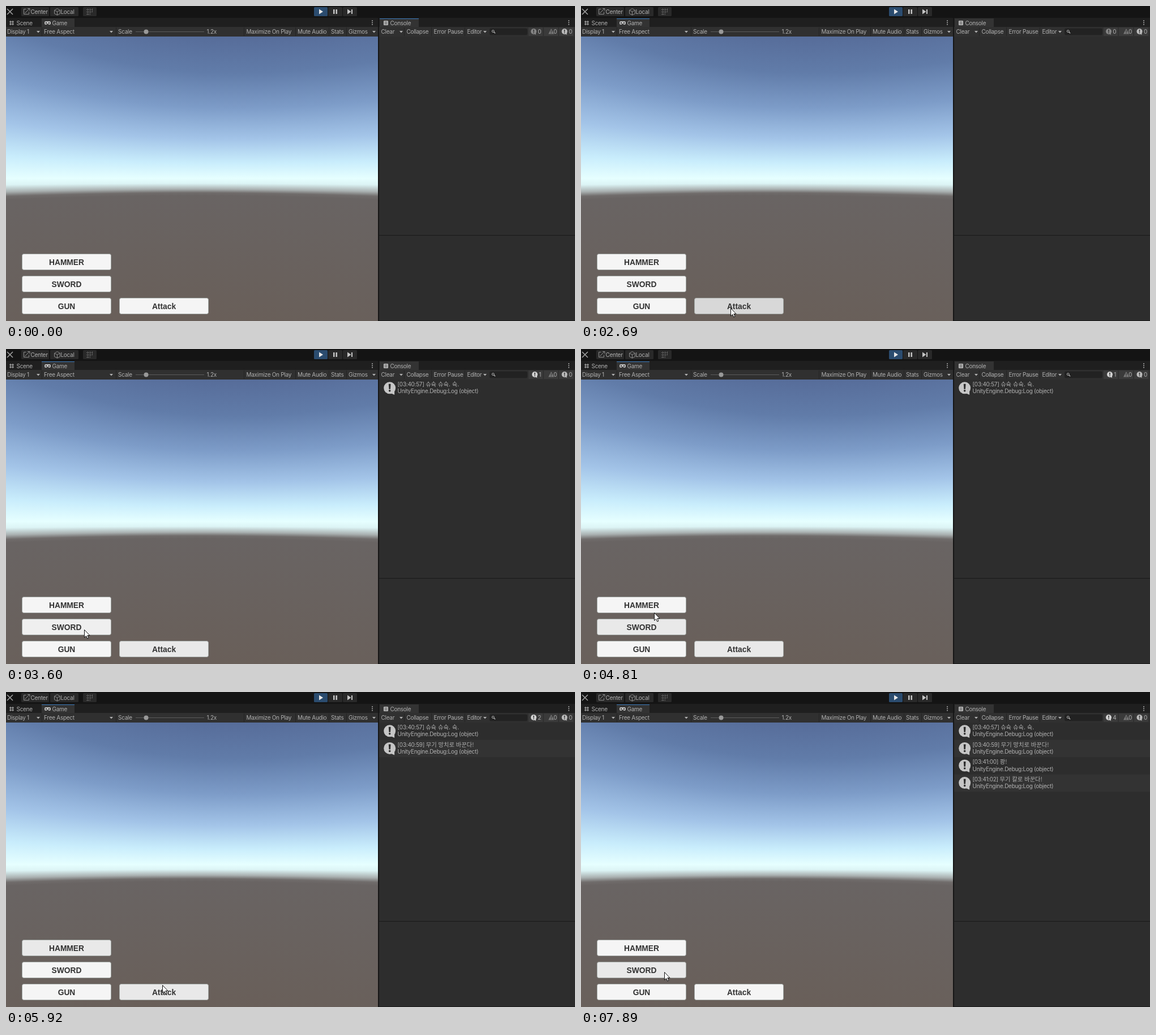
Animation of 1005 by 557 pixels, one loop 8000 ms. Source, as an HTML page with a canvas:

```html
<!DOCTYPE html>
<html lang="ko">
<head>
<meta charset="utf-8">
<title>Weapon switch demo</title>
<style>
html, body { margin: 0; width: 100%; height: 100%; overflow: hidden; background: #2d2d2d; }
canvas, svg { position: absolute; left: 0; top: 0; display: block; }
text { font: 10px Inter, "Noto Sans CJK KR", "Noto Sans CJK", sans-serif; letter-spacing: -.28px; fill: #b0b0b0; white-space: pre; }
.ko { font: 10.3px "Noto Sans CJK KR", "Noto Sans CJK", sans-serif; letter-spacing: 0; }
.label { font: bold 13.8px "Liberation Sans", Arial, sans-serif; letter-spacing: 0; fill: #323232; text-anchor: middle; }
</style>
</head>
<body>
<canvas id="sky" width="657" height="557"></canvas>
<svg id="ui" width="1005" height="557" viewBox="0 0 1005 557"></svg>
<script>
const LOOP = 8000, STEP = 70;
const $ = id => document.getElementById(id);

// Colour depends on elevation, seen through a 60 degree camera; the sky is brighter to the left.
function paintSky() {
  const g = $('sky').getContext('2d');
  const cx = 329, cy = 305, half = 252, focal = half * Math.sqrt(3);
  const sky = [[0, '#e6ffff'], [.11, '#c9edfc'], [.28, '#a3c4e8'], [.5, '#7d9cc8'], [.75, '#617ca9'], [1, '#576d9a']];
  const ground = [[0, '#e6ffff'], [.035, '#dcf4f5'], [.075, '#a9b0b0'], [.1, '#706c6b'], [.12, '#696463'], [1, '#695f59']];
  const column = (x, top, reach, stops) => {
    const fill = g.createLinearGradient(0, cy, 0, cy + reach);
    stops.forEach(([at, color]) => fill.addColorStop(at, color));
    g.fillStyle = fill;
    g.fillRect(x, top, 1, half);
  };
  for (let x = 0; x < 657; x++) {
    const u = (x - cx) / cx;
    const reach = half * Math.hypot(1, (x - cx) / focal);
    column(x, cy - half + 1, -reach * (1 - .12 * u), sky);
    column(x, cy, reach, ground);
  }
}

const box = (x, y, w, h, fill, more = '') =>
  `<rect x="${x}" y="${y}" width="${w}" height="${h}" fill="${fill}" ${more}/>`;
const path = (d, more) => `<path d="${d}" ${more}/>`;
const line = (d, color = '#8c8c8c', w = 1, more = '') =>
  path(d, `fill="none" stroke="${color}" stroke-width="${w}" ${more}`);
const text = (x, y, s, more = '') => `<text x="${x}" y="${y}" ${more}>${s}</text>`;
const arrow = x => path(`M${x - 3} 44h6l-3 3.6z`, 'fill="#b0b0b0"');
const kebab = x => [0, 1, 2].map(i => box(x - .8, 25.2 + 3.3 * i, 1.7, 1.7, '#b4b4b4')).join('');
const bubble = (x, y, r, fill, mark) => `<g transform="translate(${x} ${y}) scale(${r / 10})">
  <circle r="10" fill="${fill}"/>${path('M2 9L8 11.5 8 5z', `fill="${fill}"`)}
  ${path('M-1.8-6.6H1.8L1.2 2H-1.2z', `fill="${mark}"`)}<circle cy="4.8" r="1.7" fill="${mark}"/></g>`;

function topBar() {
  const slot = (x, w, fill = '#292929') => box(x, 2, w, 16, fill, 'rx="1.5"');
  return box(0, 0, 1005, 21, '#141414')
    + line('M2 5L12 15M12 5L2 15', '#a0a0a0', 1.6)
    + slot(27, 49) + slot(78, 50) + slot(136, 24)
    + line('M31.5 5.5h4M31.5 5.5v9h9v-4M33 13l8-8M38 4.5h4v4') + text(43.5, 13.6, 'Center')
    + line('M85.5 7.5l5-3 5 3v6l-5 2.5-5-2.5zM85.5 7.5l5 2.5 5-2.5M90.5 10v6') + text(96.5, 13.6, 'Local')
    + line('M144.5 4.5v11M148.5 4.5v11M152.5 4.5v6M142 6.5h12M142 10.5h12M142 14.5h7', '#666', 1, 'stroke-dasharray="2 1"')
    + slot(544, 24, '#2b4c6f') + slot(569, 25) + slot(595, 25)
    + path('M553 5.5l7 4.5-7 4.5z', 'fill="#e8e8e8"')
    + box(578, 6, 2.5, 8, '#c4c4c4') + box(582.5, 6, 2.5, 8, '#c4c4c4')
    + path('M603 5.5l6.5 4.5-6.5 4.5zM610 6h2v8h-2z', 'fill="#c4c4c4"');
}

function tabs() {
  return box(0, 21, 1005, 16, '#1f1f1f') + box(63, 22, 58, 15, '#333') + box(660, 22, 69, 15, '#333')
    + box(660, 22, 69, 1, '#3a79bb', 'id="consoleTab"') + box(63, 22, 58, 1, '#3a79bb', 'id="gameTab"')
    + line('M8 26v8M12 26v8M6 28h8M6 32h8', '#b4b4b4', 1.1) + text(18.5, 33.7, 'Scene')
    + path('M70 27h7q2 0 2 3t-2 3q-2 0-3.5-2-1.5 2-3.5 2-2 0-2-3t2-3z', 'fill="#bcbcbc"')
    + box(70, 29, 2, 2, '#333') + box(75, 29, 2, 2, '#333') + text(81.5, 33.7, 'Game')
    + box(667, 26, 8, 8, '#bcbcbc', 'rx="1"') + line('M668.5 28.5h5M668.5 31.5h5', '#333')
    + text(678.5, 33.7, 'Console') + kebab(647) + kebab(994);
}

function toolbars() {
  const words = [[2, 'Display 1'], [67, 'Free Aspect'], [198, 'Scale'], [354.5, '1.2x'],
    [424.5, 'Maximize On Play'], [515, 'Mute Audio'], [574, 'Stats'], [605, 'Gizmos'],
    [662.5, 'Clear'], [707.5, 'Collapse'], [755.5, 'Error Pause'], [814.5, 'Editor']];
  // A thin rule stands just before each word that opens a new control.
  const rules = words.filter(([x, s]) => x > 60 && s !== '1.2x' && s !== 'Clear');
  return box(0, 37, 1005, 17, '#303030')
    + rules.map(([x]) => box(Math.floor(x - 4), 38, 1, 15, '#232323')).join('')
    + words.map(([x, s]) => text(x, 49.2, s)).join('')
    + [57, 186, 650, 698, 846].map(arrow).join('')
    + box(229, 45, 121, 1, '#5b5b5b') + '<circle cx="247.5" cy="45.5" r="4" fill="#999"/>'
    + box(854, 39.5, 67, 12, '#222', 'rx="3"')
    + '<circle cx="860.3" cy="44.6" r="1.9" fill="none" stroke="#c0c0c0"/>' + line('M861.7 46l2.5 2.3', '#c0c0c0', 1.2)
    + [923, 950, 977].map(x => box(x, 38, 25, 15, '#3a3a3a')).join('')
    + path('M963 40l5 9.5h-10z', 'fill="#777"') + line('M963 43v3.500M963 47.300v1.200', '#333', 1.2)
    + text(967, 49.2, '0') + bubble(986.5, 45, 5, '#bdbdbd', '#333') + text(994, 49.2, '0');
}

// Each stay of the pointer on a button: enter, click, leave, and what the click logs.
const visits = [
  { id: 'attack', enter: 2690, click: 2690, leave: 5020, log: ['03:40:57', '슈슉 슈슉. 슉.'] },
  { id: 'sword', enter: 3600, leave: 4880 },
  { id: 'hammer', enter: 4880, click: 5020, leave: 6450, log: ['03:40:59', '무기 망치로 바꾼다!'] },
  { id: 'attack', enter: 5710, click: 6450, leave: 7750, log: ['03:41:00', '쾅!'] },
  { id: 'sword', enter: 7340, click: 7750, log: ['03:41:02', '무기 칼로 바꾼다!'] }
];
const clicks = visits.filter(v => v.log);
const logTimes = clicks.map(v => v.click + 2 * STEP);

function consolePane() {
  const rows = clicks.map(({ log: [clock, msg] }, i) => {
    const y = 54 + i * 30.6;
    return `<g id="row${i}">` + (i % 2 ? box(659, y, 346, 30.6, '#333') : '')
      + bubble(677.7, y + 14.8, 10.5, '#c6c6c6', '#2d2d2d')
      + text(691.5, y + 12.2, `[${clock}] <tspan class="ko">${msg}</tspan>`)
      + text(691.5, y + 24.3, 'UnityEngine.Debug:Log (object)') + '</g>';
  });
  const counts = [0, ...logTimes].map((_, n) => {
    const shift = n === 1 ? 2 : 0;
    return `<g id="count${n}">` + bubble(932 + shift, 45, 5, n ? '#d2d2d2' : '#858585', '#333')
      + text(939.3 + shift, 49.2, n) + '</g>';
  });
  return box(657, 54, 348, 503, '#2d2d2d') + box(659, 405, 346, 1, '#191919')
    + rows.join('') + counts.join('') + box(657, 21, 2, 536, '#161616') + box(659, 556, 346, 1, '#1c1c1c');
}

const button = (id, x, y, label) =>
  box(x - .5, y - .5, 157, 28, '#f5f5f5', `id="${id}" rx="3" stroke="#a3a9a6"`)
  + text(x + 78, y + 18.500, label, 'class="label"');

paintSky();
$('ui').innerHTML = topBar() + tabs() + toolbars() + consolePane()
  + button('hammer', 29, 439, 'HAMMER') + button('sword', 29, 478, 'SWORD')
  + button('gun', 29, 517, 'GUN') + button('attack', 201, 517, 'Attack')
  + path('M.5.5V14.2L3.6 11.3 5.7 16 7.9 15.1 5.9 10.5H10z', 'id="cursor" fill="#fff" stroke="#111"');

// Holds each value of [time, value] until the next one.
function hold(id, prop, steps) {
  const frames = steps.map(([t, v]) => ({ offset: t / LOOP, [prop]: v, easing: 'steps(1, end)' }));
  frames.push({ offset: 1, [prop]: steps[steps.length - 1][1] });
  $(id).animate(frames, { duration: LOOP, iterations: Infinity });
}

const show = (id, from, to = LOOP) => hold(id, 'opacity',
  [[0, from ? 0 : 1], ...(from ? [[from, 1]] : []), ...(to < LOOP ? [[to, 0]] : [])]);

show('consoleTab', 0, clicks[0].click);
show('gameTab', clicks[0].click);
logTimes.forEach((t, i) => show('row' + i, t));
[0, ...logTimes].forEach((t, i) => show('count' + i, t, logTimes[i]));

// Buttons: 1 is idle, 0 hovered or selected, negative while pressed.
const grey = v => { const c = 233 + 12 * v; return `rgb(${c}, ${c}, ${c})`; };
const fade = (t, values) => values.map((v, i) => [t + i * STEP, grey(v)]);
for (const id of ['hammer', 'sword', 'attack']) {
  const steps = [[0, grey(1)]];
  for (const { enter, click, leave } of visits.filter(v => v.id === id)) {
    if (enter !== click) steps.push(...fade(enter, [.5, 0]));
    if (click) steps.push(...fade(click, [-1.4, -2.7, -1.4, 0].slice(0, leave ? 4 : 2)));
    steps.push(...(leave ? fade(leave, [.5, 1]) : fade(click + 2 * STEP, [0])));
  }
  hold(id, 'fill', steps);
}

// Pointer strokes: start, end, bend point, end point. Each is an eased curve drawn in steps.
const strokes = [
  [990, 1730, 75, 382, 241, 534],
  [1740, 2090, 251, 534, 261, 534],
  [2270, 2340, 262, 534, 264, 534],
  [3180, 3880, 150, 488, 87, 493],
  [4740, 4880, 152, 460, 125, 450],
  [5230, 5780, 190, 535, 268, 527],
  [5780, 6120, 283, 506, 278, 532],
  [6450, 6700, 280, 534, 282, 535],
  [6870, 7480, 200, 432, 147, 495]
];

function pointerSteps() {
  const at = (x, y) => `translate(${Math.round(x)}px, ${Math.round(y)}px)`;
  const steps = [[0, at(110, 600)]];
  let x0 = 110, y0 = 546;
  for (const [from, to, bx, by, x1, y1] of strokes) {
    const n = Math.round((to - from) / STEP);
    for (let i = 0; i <= n; i++) {
      const u = i / n, s = u * u * (3 - 2 * u), r = 1 - s;
      const mix = (a, b, c) => r * r * a + 2 * r * s * b + s * s * c;
      steps.push([from + (to - from) * u, at(mix(x0, bx, x1), mix(y0, by, y1))]);
    }
    [x0, y0] = [x1, y1];
  }
  return steps;
}
hold('cursor', 'transform', pointerSteps());
</script>
</body>
</html>
```
